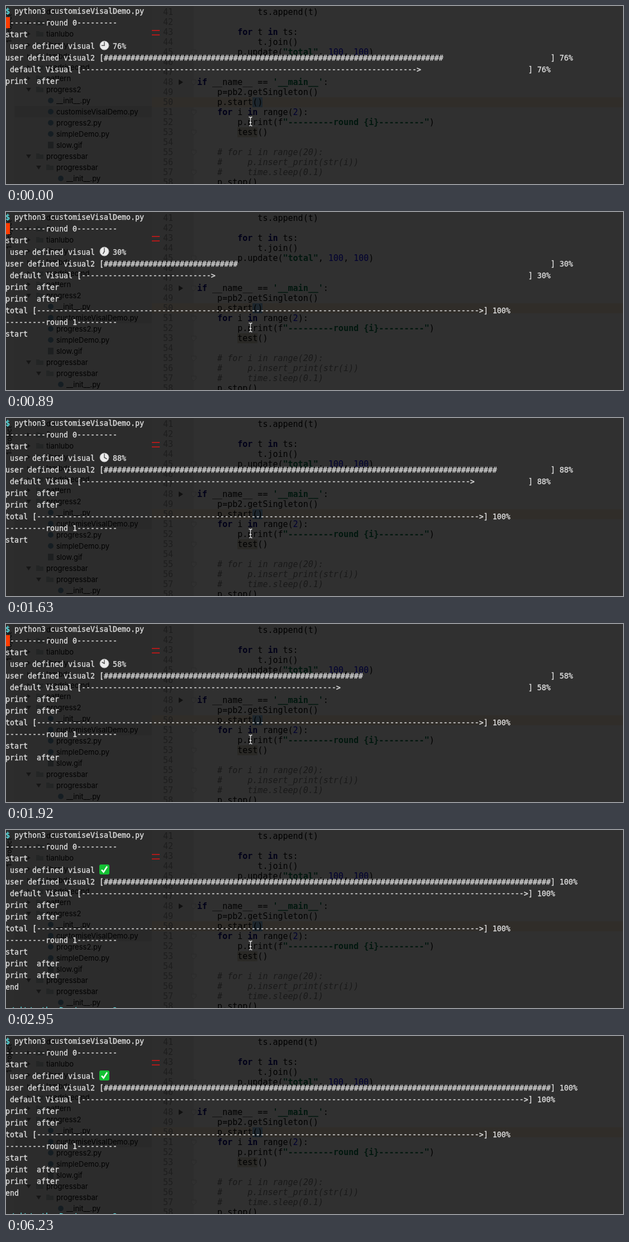
An HTML page that plays this animation: 1104x320 px, repeating every 6980 ms.

```html
<!DOCTYPE html>
<html lang="en">
<head>
<meta charset="utf-8">
<title>Terminal progress bars</title>
<style>
  html, body { margin: 0; width: 100%; height: 100%; overflow: hidden; background: #303030; }
  svg { display: block; width: 1104px; height: 320px; }
  text { white-space: pre; }
  .code { font: 15px "DejaVu Sans Mono", monospace; }
  .tree { font: 13px Inter, sans-serif; fill: #000; }
  .term { font: 13.29px "DejaVu Sans Mono", monospace; fill: #dedede; stroke: #dedede; stroke-width: .35px; }
  .k { fill: #000080; font-weight: bold; }
  .n { fill: #0000ff; }
  .s { fill: #007848; font-weight: bold; }
  .c { fill: #808080; font-style: italic; }
  .cyan { fill: #5ce6ea; stroke: #5ce6ea; }
</style>
</head>
<body>
<svg viewBox="0 0 1104 320">
  <rect width="1104" height="320" fill="#fff"/>
  <rect width="261" height="320" fill="#e8e8e8"/>
  <rect width="15" height="320" fill="#f0f0f0"/>
  <rect x="15" y="180" width="246" height="20" fill="#dadcdd"/>
  <rect x="261" width="75" height="320" fill="#f2f2f2"/>
  <rect x="261" y="164" width="843" height="18" fill="#fff0d8"/>
  <rect x="441" y="164" width="18" height="18" fill="#99ccee"/>
  <rect x="414" y="218" width="36" height="18" fill="#dedacb"/>
  <text class="tree" transform="translate(10 66) rotate(-90)" style="font-size:12px">1: Project</text>
  <g id="tree"></g>
  <g id="gutter" class="code"></g>
  <g id="code" class="code">
    <text>            ts.append(t)</text>
    <text></text>
    <text>        <tspan class="k">for</tspan> t <tspan class="k">in</tspan> ts:</text>
    <text>            t.join()</text>
    <text>        p.update(<tspan class="s">"total"</tspan>, <tspan class="n">100</tspan>, <tspan class="n">100</tspan>)</text>
    <text></text>
    <text></text>
    <text><tspan class="k">if</tspan> __name__ == <tspan class="s">'__main__'</tspan>:</text>
    <text>    p=pb2.getSingleton()</text>
    <text>    p.start()</text>
    <text>    <tspan class="k">for</tspan> i <tspan class="k">in</tspan> range(<tspan class="n">2</tspan>):</text>
    <text>        p.print(f<tspan class="s">"---------round {i}---------"</tspan>)</text>
    <text>        test()</text>
    <text></text>
    <text class="c">    # for i in range(20):</text>
    <text class="c">    #     p.insert_print(str(i))</text>
    <text class="c">    #     time.sleep(0.1)</text>
    <text>    p.stop()</text>
  </g>
  <rect width="1104" height="320" fill="#000" opacity=".81"/>
  <path d="M261 44H275M261 52H275" stroke="#b01a1a" stroke-width="2"/>

  <g id="term" class="term"></g>
  <rect id="block" y="20" width="7" height="20" fill="#ff3b00"/>
  <g id="clock" stroke-linecap="round">
    <circle cx="176" cy="71" r="8" fill="#ececec" stroke="#b4b4b4"/>
    <path d="M176 71V65" stroke="#555" stroke-width="1.4"/>
    <path id="hour" d="M176 71V66.5" stroke="#555" stroke-width="1.6"/>
  </g>
  <g id="check">
    <rect x="167" y="62" width="18" height="18" rx="3" fill="#14c034"/>
    <path d="M171 71.5L174.5 75.5L181 65.5" fill="none" stroke="#fff" stroke-width="2.6"/>
  </g>
  <path id="beam" d="M-3 -8Q0 -8 0 -5.5Q0 -8 3 -8M0 -6V6M-3 8Q0 8 0 5.5Q0 8 3 8M-2 2H2"
        fill="none" stroke="#e4e4e4" stroke-width="1.3"/>
</svg>
<script>
const LOOP = 6980, ROUND = 590, FIRST_DONE = 1920, END = 2950;
const $ = id => document.getElementById(id);

// Project tree: [kind, left edge of the icon, label], 20px per row
const tree = [
  ["dir", 54, "docs"], ["dir", 54, "flask"], ["dir", 54, "tianlubo"], ["dir", 54, "library"],
  ["dir", 54, "lambda"], ["dir", 54, "roadrivecmd"], ["dir", 54, "pattern"], ["open", 54, "progress2"],
  ["py", 72, "__init__.py"], ["py", 72, "customiseVisalDemo.py"], ["py", 72, "progress2.py"],
  ["py", 72, "simpleDemo.py"], ["img", 72, "slow.gif"], ["open", 54, "progressbar"],
  ["open", 72, "progressbar"], ["py", 90, "__init__.py"]
];
$("tree").innerHTML = tree.map(([kind, x, label], i) => {
  const y = 10 + i * 20;
  let icon;
  if (kind === "py") icon = `<circle cx="${x + 8}" cy="${y}" r="5" fill="#6f98b5"/>`;
  else if (kind === "img") icon = `<path d="M${x + 3} ${y - 6}h10v12h-10z" fill="#9aa3a8"/>`;
  else {
    const arrow = kind === "open" ? `M${x - 18} ${y - 3}h9l-4.5 7z` : `M${x - 16} ${y - 4}v8l6 -4z`;
    icon = `<path d="${arrow}" fill="#777"/>
      <path d="M${x} ${y - 5}h5l2 2h6v8h-13z" fill="#bcc3c7"/>`;
  }
  return icon + `<text class="tree" x="${x + 18}" y="${y + 5}">${label}</text>`;
}).join("");

// Editor lines and gutter
const lineY = i => 11 + i * 18;
[...$("code").children].forEach((line, i) => {
  line.setAttribute("x", 342);
  line.setAttribute("y", lineY(i) + 5);
});
let gutter = `<path d="M309 132v10l8 -5z" fill="#555"/>`;
for (let i = 0; i < 18; i++)
  gutter += `<text x="281" y="${lineY(i) + 5}" fill="#999">${41 + i}</text>`;
for (const n of [45, 48, 51, 53, 55, 57])
  gutter += `<path d="M332 ${lineY(n - 41) - 4}h8v5l-4 4l-4 -4z" fill="#fff" stroke="#d8d8d8"/>`;
$("gutter").innerHTML = gutter;

// [time, percent, clock hour]
const steps = [
  [0, 76, 9], [150, 82, 3], [300, 88, 7], [440, 94, 11], [590, 11, 2], [740, 21, 5],
  [890, 30, 7], [1030, 42, 10], [1180, 53, 2], [1330, 65, 6], [1480, 77, 12], [1630, 88, 4],
  [1770, 98, 8], [1920, 58, 10], [2060, 62, 4], [2210, 72, 1], [2360, 76, 5], [2510, 82, 9],
  [2660, 85, 3], [2800, 95, 7], [2950, 100, 12]
];
const blinks = [[0, 1], [300, 0], [740, 1], [1330, 0], [1770, 1], [2360, 0], [2800, 1], [2950, 0]];
const beams = [[0, 437.5, 207.5], [5800, 444.5, 210.5], [5940, 457, 230], [6090, 520, 257], [6230, -50, -50]];
const at = (list, t) => list.findLast(item => item[0] <= t);

const arrowBar = n => "[" + "-".repeat(n - 1) + "&gt;" + " ".repeat(100 - n) + "] " + n + "%";
const hashBar = n => "[" + "#".repeat(n).padEnd(100) + "] " + n + "%";
const heading = n => "---------round " + n + "---------";

function lines(t, n) {
  const done = t >= END, after = "print  after";
  const out = [
    '<tspan class="cyan">$</tspan> python3 customiseVisalDemo.py',
    heading(0), "start",
    " user defined visual" + (done ? "" : "    " + n + "%"),
    "user defined visual2 " + hashBar(n),
    " default Visual " + arrowBar(n),
    after
  ];
  if (t >= ROUND) out.push(after, "total " + arrowBar(100), heading(1), "start");
  if (t >= FIRST_DONE) out.push(after);
  if (done) out.push(after, "end", "", '<tspan class="cyan">~/git/pythonPro/progress2</tspan>');
  return out;
}

let shown;
function draw() {
  const t = performance.now() % LOOP;
  const step = at(steps, t), done = t >= END;
  if (step !== shown) {
    shown = step;
    $("term").innerHTML = lines(t, step[1]).map((s, i) =>
      `<text x="-1" y="${14 + i * 21}">${s}</text>`).join("");
    $("hour").setAttribute("transform", `rotate(${step[2] * 30} 176 71)`);
    $("clock").style.display = done ? "none" : "";
    $("check").style.display = done ? "" : "none";
  }
  $("block").style.display = at(blinks, t)[1] ? "" : "none";
  const [, x, y] = at(beams, t);
  $("beam").setAttribute("transform", `translate(${x} ${y})`);
  requestAnimationFrame(draw);
}
draw();
</script>
</body>
</html>
```
